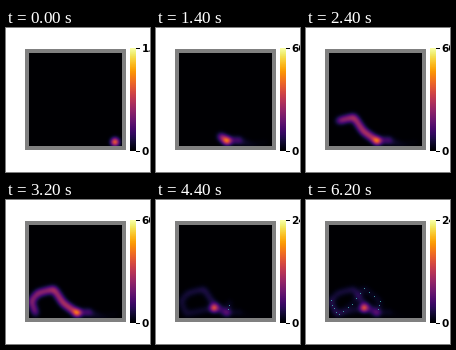
A matplotlib script that plays this animation: 144 by 144 pixels, repeating every 8 s.

```python
import numpy as np
import matplotlib.pyplot as plt
from matplotlib.animation import FuncAnimation
from matplotlib.patches import Rectangle

SIZE, DPI = 144, 100
STEP, FRAMES, LAST = 200, 40, 31
SIGMA = 3.0
LEFT, TOP, RIGHT, BOTTOM = 23, 25, 116, 118

# The walker passes one of these points every 400 ms.
ROUTE = np.array([
    (109, 114), (98, 117), (80, 112), (71, 113), (57, 103), (48, 89),
    (32, 93), (25, 101), (30, 114), (58, 108), (71, 114), (74, 101),
    (58, 88), (46, 104), (32, 115), (25, 104), (24, 90),
])
# time, x, y, extra weight where it lingers
STOPS = [(0, 109, 114, 0.6), (800, 83, 112, 5), (1300, 71, 113, 18),
         (3700, 58, 108, 45), (4200, 58, 108, 60)]


def place(t):
    knots = np.arange(len(ROUTE)) * 400
    return [np.interp(t, knots, ROUTE[:, i]) for i in (0, 1)]


def strength(t):
    rise = 0.6 * np.exp(np.minimum(t, 1230) / 320)
    return rise * np.exp(-np.maximum(t - 1230, 0) / 4000)


def bell(cells, centers):
    return np.exp(-((cells - centers[:, None]) ** 2) / (2 * SIGMA ** 2))


t = np.arange(0, LAST * STEP + 1, 20)
px, py = place(t)
length = np.hypot(np.diff(px, prepend=px[0]), np.diff(py, prepend=py[0]))
weight = strength(t) * length / (SIGMA * np.sqrt(2 * np.pi))
deposits = np.vstack((np.column_stack((t, px, py, weight)), STOPS))
dot_times = np.arange(4150, LAST * STEP, 130)


def density(now):
    d = deposits[deposits[:, 0] <= now]
    across = bell(np.arange(LEFT, RIGHT) + 0.5, d[:, 1])
    down = bell(np.arange(TOP, BOTTOM) + 0.5, d[:, 2])
    return down.T @ (across * d[:, 3:])


def scale_top(peak):
    # the scale doubles whenever the peak passes three quarters of it
    return max(1, 15 * 2 ** np.ceil(np.log2(peak / 0.75 / 15)))


fig = plt.figure(figsize=(SIZE / DPI, SIZE / DPI), dpi=DPI, facecolor="white")
ax = fig.add_axes([0, 0, 1, 1])
ax.axis("off")


def box(x, y, w, h, color, z=3):
    patch = Rectangle((x, y), w, h, fc=color, lw=0, aa=False, zorder=z)
    return ax.add_patch(patch)


def label(y, text):
    return ax.text(135.5, y, text, family="DejaVu Sans", weight="bold",
                   size=10.5 * 72 / DPI, color="black", va="baseline")


box(19, 21, 101, 101, "#808080", 0)
heat = ax.imshow(density(0), cmap="inferno", vmin=0, vmax=1,
                 extent=(LEFT, RIGHT, BOTTOM, TOP),
                 interpolation="nearest", zorder=1)
ax.imshow(np.linspace(1, 0, 256)[:, None], cmap="inferno",
          extent=(124, 130, 123, 20), interpolation="nearest", aspect="auto")
for y in (20, 123):
    box(130, y, 4, 1, "black")
top_label = label(24, "")
label(127, "0")
dots = [box(round(x), round(y), 1, 1, "#3a9aa0")
        for x, y in zip(*place(dot_times))]
ax.set(xlim=(0, SIZE), ylim=(SIZE, 0))
ax.set_aspect("auto")


def draw(frame):
    now = min(frame, LAST) * STEP
    field = density(now)
    top = scale_top(field.max())
    heat.set_data(field / top)
    top_label.set_text(f"{top:.1f}")
    for dot, start in zip(dots, dot_times):
        dot.set_visible(now >= start)
    return [heat, top_label, *dots]


anim = FuncAnimation(fig, draw, frames=FRAMES, interval=STEP,
                     repeat=True, repeat_delay=0, blit=False)
plt.show()
```
